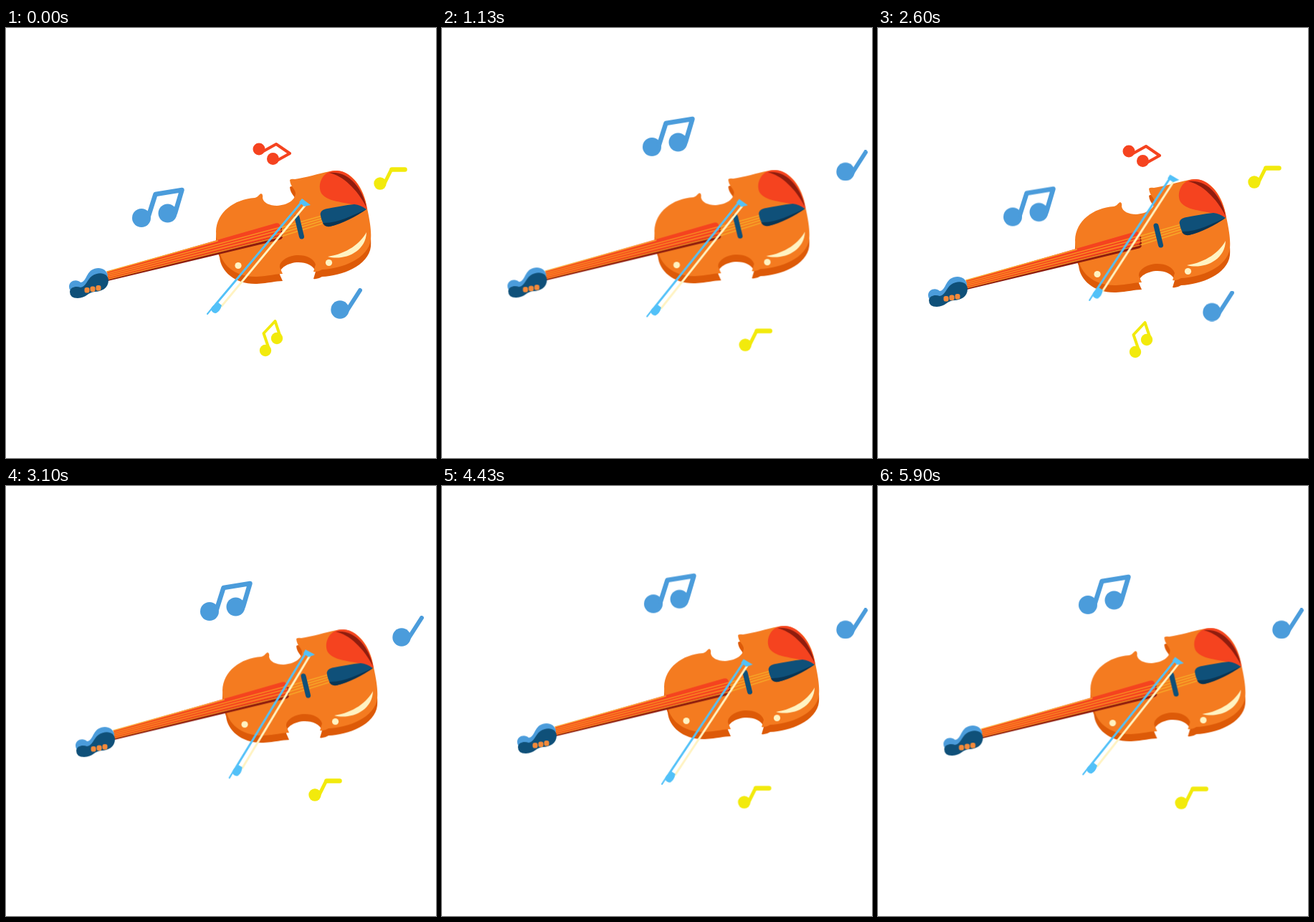
An HTML page without scripts that plays this animation: 600x600 px, repeating every 5930 ms.

```html
<!DOCTYPE html>
<html lang="en">
<head>
<meta charset="utf-8">
<title>Violin and notes</title>
<style>
  html, body { margin: 0; width: 100%; height: 100%; overflow: hidden; background: #fff; }
  svg { display: block; width: 100vw; height: 100vh; }

  :root {
    --orange: #f47b20; --rust: #dd5a08; --red: #f5431f; --wine: #8f1d0e;
    --navy: #0f5079; --blue: #4b9cdb; --cyan: #52c1f8; --cream: #fff3c2; --yellow: #f2ea0c;
  }
  .line { fill: none; stroke-linecap: round; stroke-linejoin: round; }
  .blue { fill: var(--blue); stroke: var(--blue); }
  .red { fill: var(--red); stroke: var(--red); }
  .yellow { fill: var(--yellow); stroke: var(--yellow); }
  .dot { stroke: none; }

  /* 17 poses per cycle: 6 + 5 + 6 */
  .violin, .bow, .set, .set use { animation: 1186ms step-end infinite; }
  .violin { animation-name: sway; }
  .bow { animation-name: stroke; transform-origin: 348.5px 320.5px; }
  .one { animation-name: show-one; }
  .two { animation-name: show-two; }
  .three { animation-name: show-three; }
  .one use { animation-name: drift-one; }
  .three use { animation-name: drift-three; }

  @keyframes sway {
    0% { transform: translate(0, 0); animation-timing-function: steps(6); }
    35.294% { transform: translate(-36px, 24px); animation-timing-function: steps(5); }
    64.706% { transform: translate(20.3px, -4.5px); animation-timing-function: steps(6); }
    100% { transform: translate(0, 0); }
  }
  @keyframes stroke {
    0% { transform: translate(0, 0) rotate(0); animation-timing-function: steps(6); }
    35.294% { transform: translate(9px, -53px) rotate(-13.4deg); animation-timing-function: steps(5); }
    64.706% { transform: translate(20.4px, 12px) rotate(-7.5deg); animation-timing-function: steps(6); }
    100% { transform: translate(0, 0) rotate(0); }
  }
  @keyframes show-one { 0% { opacity: 1; } 35.294%, 100% { opacity: 0; } }
  @keyframes show-two { 0% { opacity: 0; } 35.294% { opacity: 1; } 64.706%, 100% { opacity: 0; } }
  @keyframes show-three { 0% { opacity: 0; } 64.706%, 100% { opacity: 1; } }
  @keyframes drift-one {
    0% { transform: translate(0, 0); animation-timing-function: steps(6); }
    35.294%, 100% { transform: translate(var(--dx), var(--dy)); }
  }
  @keyframes drift-three {
    0% { transform: translate(0, 0); }
    64.706% { transform: translate(0, 0); animation-timing-function: steps(6); }
    100% { transform: translate(var(--dx), var(--dy)); }
  }
</style>
</head>
<body>
<svg viewBox="0 0 600 600">
  <defs>
    <g id="pair" class="blue">
      <circle class="dot" r="13"/>
      <circle class="dot" cx="36.5" cy="-6.5" r="13"/>
      <path class="line" stroke-width="6.5" d="M10 -3 L19.5 -33 L56.5 -39 L47 -7"/>
    </g>
    <g id="single" class="blue">
      <circle class="dot" r="12.7"/>
      <path class="line" stroke-width="6" d="M10 1 L28 -27"/>
    </g>
    <g id="flag" class="yellow">
      <circle class="dot" r="8.7"/>
      <path class="line" stroke-width="5" d="M6.5 -1 L15.5 -19"/>
      <path class="line" stroke-width="6.5" d="M16.5 -19.5 H34.5"/>
    </g>
    <g id="ruby" class="red">
      <circle class="dot" r="8.5"/>
      <circle class="dot" cx="19.5" cy="13.5" r="8.5"/>
      <path class="line" stroke-width="4" d="M6 3 L24 -7 L43 6 L25 16"/>
    </g>
    <g id="lemon" class="yellow">
      <circle class="dot" r="8.2"/>
      <circle class="dot" cx="16" cy="-17" r="8.2"/>
      <path class="line" stroke-width="4" d="M4 -5 L-2.5 -24 L13.5 -41 L20.5 -20"/>
    </g>
    <path id="body" d="M293 284 C294 257 318 239 347 237 C352 236 353 232 356 231 Q359 232 358 237
      C359 244 368 248 378 248 C393 247 404 240 404 230 C403 224 397 222 396 212
      Q398 210 403 211 C418 209 436 203 452 200 C478 194 499 219 504 252
      C508 270 510 284 509 295 C506 322 468 336 441 337 Q435 341 429 340 L432 330
      C429 321 419 317 408 317 C394 317 381 325 382 334 L386 343
      C376 343 367 346 350 347 C320 348 300 330 298 310 Q293 298 293 284Z"/>
  </defs>

  <g class="set one">
    <use href="#pair" x="189" y="265" style="--dx:-2px;--dy:-3px"/>
    <use href="#ruby" x="353" y="169" style="--dx:-6px;--dy:6px"/>
    <use href="#flag" x="522" y="217" style="--dx:6px;--dy:-4px"/>
    <use href="#single" x="466" y="393" style="--dx:0px;--dy:7px"/>
    <use href="#lemon" x="362" y="450" style="--dx:-6px;--dy:4px"/>
  </g>
  <g class="set two">
    <use href="#pair" x="284" y="175"/>
    <use href="#single" x="552" y="211"/>
    <use href="#flag" x="431" y="431"/>
  </g>
  <g class="set three">
    <use href="#pair" x="295.4" y="164" style="--dx:-3px;--dy:2.2px"/>
    <use href="#single" x="563" y="200.5" style="--dx:0px;--dy:0px"/>
    <use href="#flag" x="421.3" y="441" style="--dx:2.2px;--dy:1.5px"/>
  </g>

  <g class="violin">
    <use href="#body" y="10" fill="var(--rust)"/>
    <use href="#body" fill="var(--orange)"/>

    <!-- chin rest -->
    <path fill="var(--red)" d="M447 203 C437 210 435 226 442 233 C453 245 482 242 504 253
      C500 228 484 200 462 199 Q452 199 447 203Z"/>
    <path fill="var(--wine)" d="M451 202 C470 206 490 225 503 250 C497 224 479 199 451 202Z"/>

    <!-- highlights -->
    <g fill="var(--cream)">
      <path d="M503 285 C495 300 476 315 449 319 C470 325 502 314 503 285Z"/>
      <circle cx="324" cy="331.5" r="4.6"/>
      <circle cx="450.5" cy="327.5" r="4.6"/>
    </g>

    <!-- neck -->
    <path fill="var(--wine)" d="M142 347 L376 284 L385 279 L386 291 Q386 295 380 296 L142 353Z"/>
    <path fill="var(--red)" d="M141 340 L376 272.5 Q382 271 383 277 L384 286 Q384 290 378 291 L142 350Z"/>
    <path class="line" stroke="#f9a22c" stroke-width="1.8" d="M141 340 L295 297"/>
    <g class="line" stroke="#f98c22" stroke-width="1.3">
      <path d="M141 343 L383 278"/>
      <path d="M141 345.5 L383 282"/>
      <path d="M141 348 L383 286.5"/>
      <path d="M142 350.5 L383 291"/>
    </g>
    <path class="line" stroke="#f7a828" stroke-width="1.6"
      d="M385 278 L441 262 M385 282 L441 265.5 M385 286 L441 269 M385 290.5 L441 273"/>
    <path class="line" stroke="var(--navy)" stroke-width="7" d="M406 264 L412.5 291"/>

    <!-- tailpiece -->
    <path fill="var(--navy)" d="M439 262 Q437 255 446 252.5 C460 250 474 247 486 246 Q495 247 503 253
      C488 262 470 272 452 277 Q442 278 439 262Z"/>
    <path fill="#0a3553" d="M442 272 C462 273 482 262 503 253 C488 263 470 273 452 277 Q444 278 442 272Z"/>

    <!-- scroll -->
    <path fill="var(--blue)" d="M88 361 C88 352 99 350 104 355 C111 355 112 343 119 338
      C128 332 140 335 142 345 L138 358 L96 370 Q88 368 88 361Z"/>
    <path fill="var(--navy)" d="M89 368 C90 361 98 360 104 362 C112 361 113 351 120 346
      C130 339 143 342 143 352 C143 363 133 368 124 368 C115 368 112 377 100 377 Q89 377 89 368Z"/>
    <g fill="#f58a3a">
      <rect x="109.5" y="362" width="7" height="7.5" rx="2.8"/>
      <rect x="117.5" y="360.5" width="7" height="7.5" rx="2.8"/>
      <rect x="125.5" y="359" width="7" height="7.5" rx="2.8"/>
    </g>
  </g>

  <g class="bow">
    <path class="line" stroke="var(--cream)" stroke-width="2.8" d="M301 388 L417 248"/>
    <path class="line" stroke="var(--cyan)" stroke-width="2.8" d="M288 391 L414 241"/>
    <path class="line" stroke="var(--cyan)" stroke-width="2" d="M281 399 L290 388"/>
    <path fill="var(--cyan)" d="M409 243 L413 238 L425 247 L416 249Z"/>
    <path fill="var(--cyan)" d="M286 393 L295 382 L301 387 Q299 395 293 398 Q288 398 286 393Z"/>
  </g>
</svg>
</body>
</html>
```
